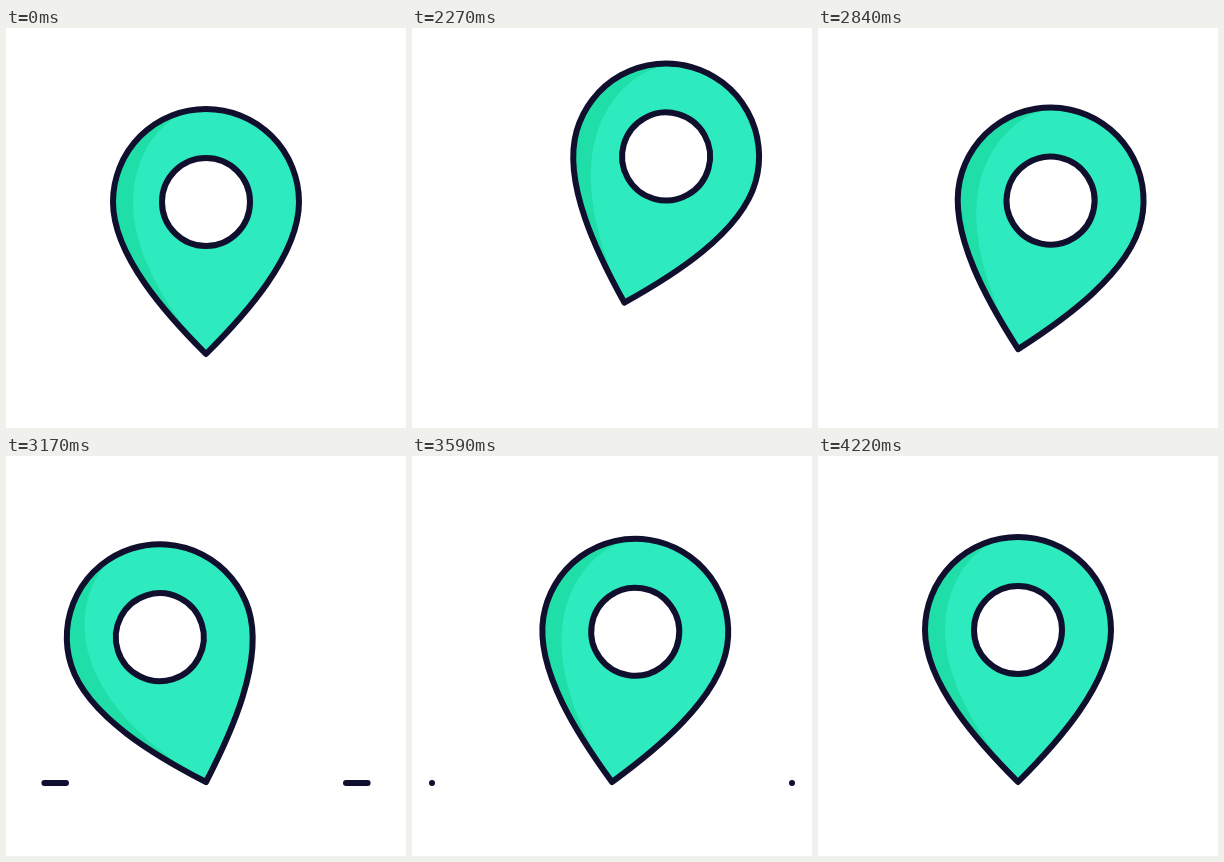
Recreate the animation shown at these times as an HTML page. Size 400 by 400 pixels, loop 4490 ms.

```html
<!DOCTYPE html>
<html lang="en">
<head>
<meta charset="utf-8">
<title>Map pin</title>
<style>
  html, body { margin: 0; width: 100%; height: 100%; overflow: hidden; background: #fff; }
  svg { display: block; width: 100%; height: 100%; }
  .line { stroke: #100f2e; stroke-width: 6; stroke-linecap: round; stroke-linejoin: round; }
</style>
</head>
<body>
<svg viewBox="0 0 400 400">
  <g id="dashes" class="line">
    <line y1="327" y2="327"/>
    <line y1="327" y2="327"/>
  </g>
  <!-- The pin is drawn around its tip at 0,0 -->
  <g id="pin">
    <path fill="#20dea8" d="M0-245A93 93 0 0 0-93-152C-93-98-38-38 0 0L20-60V-245Z"/>
    <path fill="#2eeabf" d="M0-245C-40-245-73-203-73-152C-73-94-30-34 0 0C38-38 93-98 93-152A93 93 0 0 0 0-245Z"/>
    <path class="line" fill="none" d="M0 0C-38-38-93-98-93-152A93 93 0 0 1 93-152C93-98 38-38 0 0Z"/>
    <circle class="line" fill="#fff" cy="-152" r="44"/>
  </g>
</svg>
<script>
const LOOP = 4490, START = 2030, STEP = 30, END = 4220;
const TOP = 2600, LAND = 2850;
const TILT = 24.2, LIFT = 78, DRIFT = 28.5;

// Swing extremes after the jump: time, degrees
const SWINGS = [[TOP, TILT], [3125, -18.6], [3520, 10], [3890, -4.1], [4225, 0]];

const pin = document.getElementById('pin');
const dashes = document.getElementById('dashes');
const [left, right] = dashes.children;

const progress = (t, a, b) => Math.min(1, Math.max(0, (t - a) / (b - a)));
const sineOut = u => Math.sin(u * Math.PI / 2);
const smooth = u => (1 - Math.cos(u * Math.PI)) / 2;

const rise = t => sineOut(progress(t, 2000, 2590));

function height(t) {
  return t < TOP ? rise(t) : Math.cos(progress(t, TOP, LAND) * Math.PI / 2);
}

function angle(t) {
  if (t < TOP) return TILT * rise(t);
  const i = SWINGS.findIndex(s => s[0] > t);
  if (i < 0) return 0;
  const [t0, a0] = SWINGS[i - 1], [t1, a1] = SWINGS[i];
  const u = progress(t, t0, t1);
  return a0 + (a1 - a0) * smooth(i === 1 ? u ** 1.33 : u);
}

function drawDashes(t) {
  const shown = t > LAND && t < 3610;
  dashes.style.display = shown ? '' : 'none';
  if (!shown) return;
  const outer = 112 - 92 * sineOut(progress(t, 2860, 3385));
  const inner = 112 - 92 * sineOut(progress(t, 2910, 3590));
  left.setAttribute('x1', outer);
  left.setAttribute('x2', inner);
  right.setAttribute('x1', 400 - outer);
  right.setAttribute('x2', 400 - inner);
}

function draw(time) {
  const now = time % LOOP;
  const t = START + Math.floor((now - START) / STEP) * STEP;
  const moving = t >= START && t < END;
  const h = moving ? height(t) : 0;
  const a = moving ? angle(t) : 0;
  pin.setAttribute('transform',
    `translate(${200 + DRIFT * h * h} ${326 - LIFT * h}) rotate(${a})`);
  drawDashes(t);
}

const origin = performance.now();
function tick() {
  draw(performance.now() - origin);
  requestAnimationFrame(tick);
}
tick();
</script>
</body>
</html>
```
